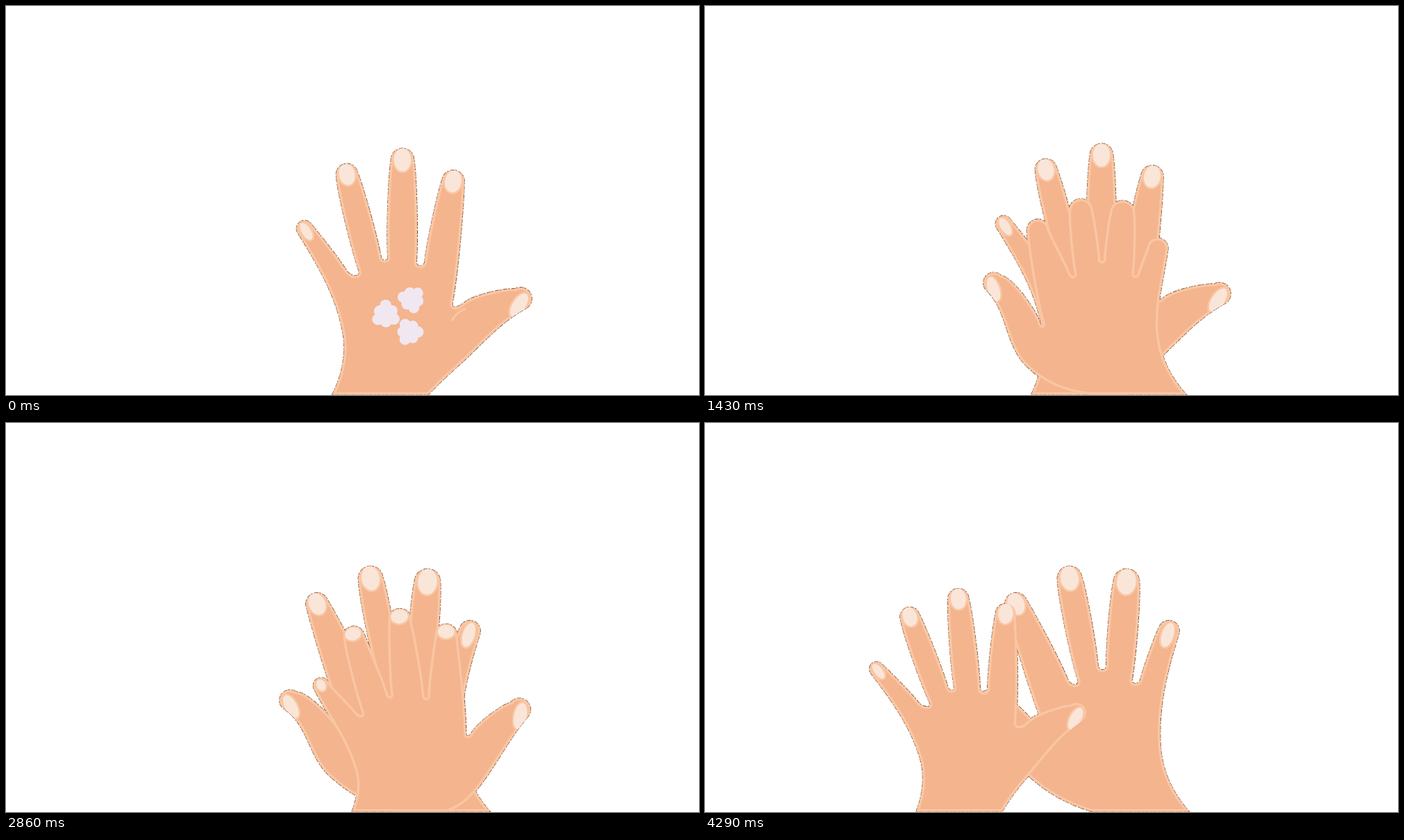
Recreate the animation shown at these times as an HTML page with a canvas. Size 998 by 561 pixels, loop 4420 ms.

```html
<!DOCTYPE html>
<html lang="en">
<head>
<meta charset="utf-8">
<title>Washing hands</title>
<style>
  html, body { margin: 0; width: 100%; height: 100%; overflow: hidden; background: #fff; }
  canvas { display: block; }
</style>
</head>
<body>
<canvas width="998" height="561"></canvas>
<script>
const ctx = document.querySelector('canvas').getContext('2d');
const STEP = 130, STEPS = 34, BOTTOM = 560.5, PIVOT = [570, 450];
const SKIN = '#f4b48d', RIM = '#f9c6a3', NAIL = '#fae5d9', EDGE = '#86583c', FOAM = '#f1e7f1';

// Open hands, key points from left to right.
// Finger: tip centre x y, tip radius, base x y. Gap: lowest point x y, half width.
const handA = {
  thumb: 4,
  wrist: [470, 608],
  waist: [[484, 465], [650, 520]],
  fingers: [[430, 321, 11.5, 480, 403], [491, 243, 15.5, 522, 378], [571, 222, 16.5, 571, 371],
    [644, 253, 16, 620, 392], [741, 422, 16, 672, 460]],
  gaps: [[499, 390, 9], [545, 367, 5], [597, 375, 6], [652, 436, 9]]
};
const handB = {
  thumb: 0,
  wrist: [558, 697],
  waist: [[465, 508], [656, 465]],
  fingers: [[409, 400, 15, 470, 440], [448, 261, 16, 500, 385], [525, 224, 17.5, 551, 367],
    [607, 229, 18.5, 596, 366], [668, 300, 15, 641, 386]],
  gaps: [[487, 450, 4], [530, 378, 7], [572, 356, 6], [621, 376, 6]]
};

// Pose: shift x y, turn of the hand, scale, bend of the fingers, turn of the thumb
const pose = (x = 0, y = 0, turn = 0, scale = 1, bend = 0, thumb = 0) => [x, y, turn, scale, bend, thumb];
const open = pose(), under = pose(0, -7), aside = pose(-186, 8, -5.6, .9);
const over = pose(16, 24, -6, 1, .25, -15), rubA = pose(14, 38, -5, 1, .4, -28);
const fist = pose(4, -18, 0, 1, .85, -32), rubB = pose(-2, 12, 1, 1, .42, 10);
const moved = ([x, y, ...rest], dx, dy = 0) => [x + dx, y + dy, ...rest];

const keysA = [
  [0, open], [7, under], [15, under], [17, moved(aside, -73)], [18, aside], [20, aside],
  [21, over], [22, over], [26, rubA], [28, moved(rubA, 104)], [30, rubA], [31, aside], [33, aside]
];
const keysB = [
  [1, moved(rubB, 89, 130)], [4, rubB], [5, moved(fist, 10)], [7, fist], [11, rubB],
  [14, moved(fist, 6)], [15, rubB], [18, open], [33, open]
];

const along = (p, v, d) => [p[0] + v[0] * d, p[1] + v[1] * d];
const dist = (p, q) => Math.hypot(q[0] - p[0], q[1] - p[1]);
const unit = (p, q) => { const d = dist(p, q) || 1; return [(q[0] - p[0]) / d, (q[1] - p[1]) / d]; };
const rad = deg => deg * Math.PI / 180;
const rotate = ([x, y], deg) => {
  const c = Math.cos(rad(deg)), s = Math.sin(rad(deg));
  return [x * c - y * s, x * s + y * c];
};

function poseAt(keys, step) {
  if (step < keys[0][0]) return null;
  const next = keys.findIndex(k => k[0] > step);
  if (next < 0) return keys[keys.length - 1][1];
  const [t0, from] = keys[next - 1], [t1, to] = keys[next];
  return from.map((v, i) => v + (to[i] - v) * (step - t0) / (t1 - t0));
}

function makeHand(shape, values) {
  if (!values) return null;
  const [dx, dy, turn, scale, bend, thumbTurn] = values;
  const place = (x, y) => along(rotate([x - PIVOT[0], y - PIVOT[1]], turn), [1, 1], 0)
    .map((v, i) => v * scale + PIVOT[i] + [dx, dy][i]);

  // Bent fingers get shorter and lean less; the thumb only turns about its base.
  const fingers = shape.fingers.map(([tx, ty, r0, bx, by], i) => {
    const thumb = i === shape.thumb, r = r0 * scale;
    const lean = thumb ? 1 : Math.max(.4, 1 - 1.5 * bend);
    const reach = thumb ? 1 : 1 - bend, spin = turn + (thumb ? thumbTurn : 0);
    const tip = along(place(bx, by), rotate([(tx - bx) * lean, (ty - by) * reach], spin), scale);
    const dir = unit([0, 0], rotate([(tx - bx) * lean, ty - by], spin));
    const side = [-dir[1], dir[0]];
    return { tip, r, dir, side, thumb, bulge: thumb ? .1 : .025,
      angle: Math.atan2(side[1], side[0]), left: along(tip, side, -r), right: along(tip, side, r) };
  });
  const gaps = shape.gaps.map(([x, y, w]) => [...place(x, y), w * scale * Math.max(.4, 1 - 2.4 * bend)]);

  const path = new Path2D();
  const curve = (...points) => path.bezierCurveTo(...points.flat());
  const cap = f => path.arc(...f.tip, f.r, f.angle + Math.PI, f.angle + 2 * Math.PI);
  const flank = (k, tip, dir) => {
    const wrist = [place(shape.wrist[k], 561)[0], BOTTOM], waist = place(...shape.waist[k]);
    const t = unit(tip, wrist), d = dist(waist, tip) * .35;
    return { wrist, waist, bow: along(waist, t, dist(waist, wrist) / 2),
      low: along(waist, t, -d), high: along(tip, dir, -d) };
  };
  // Control points down a finger's side, from its tip to the edge of a gap
  const fingerSide = (f, from, to, sign) => {
    const d = dist(from, to), out = sign * f.bulge * d;
    return [along(along(from, f.dir, -d * .15), f.side, out),
      along(along(to, unit(to, from), d * .25), f.side, out)];
  };

  const first = fingers[0], last = fingers[4];
  const l = flank(0, first.left, first.dir), r = flank(1, last.right, last.dir);
  path.moveTo(...l.wrist);
  path.quadraticCurveTo(...l.bow, ...l.waist);
  curve(l.low, l.high, first.left);
  cap(first);
  gaps.forEach(([x, y, w], k) => {
    const f = fingers[k], g = fingers[k + 1];
    const p = [x - w, y - w], q = [x + w, y - w];
    const [f1, f2] = fingerSide(f, f.right, p, 1), [g1, g2] = fingerSide(g, g.left, q, -1);
    curve(f1, f2, p);
    curve(along(p, unit(p, f2), -w * 1.33), along(q, unit(q, g2), -w * 1.33), q);
    curve(g2, g1, g.left);
    cap(g);
  });
  curve(r.high, r.low, r.waist);
  path.quadraticCurveTo(...r.bow, ...r.wrist);
  path.closePath();
  return { path, fingers, sign: shape.thumb ? 1 : -1, nailSize: Math.max(0, 1 - 6.2 * bend * bend) };
}

function drawEdge({ path }) {
  ctx.setLineDash([6, 1, 3, 2]);
  ctx.lineWidth = 1.8;
  ctx.strokeStyle = EDGE;
  ctx.stroke(path);
  ctx.setLineDash([]);
}

function drawNail({ tip, r, dir, side, angle, thumb }, outer, sign, size) {
  if (size < .15) return;
  const back = outer ? .4 : 0, shift = thumb ? .45 * sign : 0;
  const centre = along(along(tip, side, shift * r), dir, r * ((1 - size) * .8 - back * size));
  const width = r * (outer ? .57 : .74), length = r * size * (outer ? 1.2 : 1);
  ctx.beginPath();
  ctx.ellipse(...centre, width, length, angle - (thumb ? sign * rad(28) : 0), 0, 7);
  ctx.lineWidth = 5;
  ctx.stroke();
  ctx.fillStyle = NAIL;
  ctx.fill();
}

function drawSkin({ path, fingers, sign, nailSize }) {
  ctx.save();
  ctx.fillStyle = SKIN;
  ctx.fill(path);
  ctx.clip(path);
  ctx.strokeStyle = RIM;
  ctx.lineWidth = 7;
  ctx.stroke(path);
  fingers.forEach((f, i) => drawNail(f, i % 4 === 0, sign, f.thumb ? 1 : nailSize));
  ctx.restore();
}

function blob(x, y, r, turn) {
  ctx.beginPath();
  ctx.arc(x, y, r * .75, 0, 7);
  for (let i = 0; i < 6; i++) {
    const a = turn + i * Math.PI / 3, d = r * (i % 2 ? .5 : .66);
    ctx.moveTo(x, y);
    ctx.arc(x + d * Math.cos(a), y + d * Math.sin(a), r * .42, 0, 7);
  }
  ctx.fill();
}

function drawFoam(step) {
  ctx.lineWidth = 3.5;
  ctx.strokeStyle = RIM;
  ctx.beginPath();
  ctx.moveTo(642, 454);
  ctx.quadraticCurveTo(648, 442, 662, 436);
  ctx.stroke();
  ctx.fillStyle = FOAM;
  const spots = step < 5
    ? [[547, 445, 20], [584, 423, 19], [581, 470, 19]]
    : [[514, 328, 10], [571, 324, 10], [574, 302, 8]];
  spots.forEach(([x, y, r], i) => blob(x, y, r, .5 + i * .8));
}

function render(step) {
  ctx.fillStyle = '#fff';
  ctx.fillRect(0, 0, 998, 561);
  const a = makeHand(handA, poseAt(keysA, step));
  const b = makeHand(handB, poseAt(keysB, step));
  const hands = (step < 19 ? [a, b] : [b, a]).filter(Boolean);
  hands.forEach(drawEdge);
  hands.forEach(hand => {
    drawSkin(hand);
    if (hand === a && step < 11) drawFoam(step);
  });
}

const begin = performance.now();
function tick() {
  render(Math.floor((performance.now() - begin) / STEP) % STEPS);
  requestAnimationFrame(tick);
}
tick();
</script>
</body>
</html>
```
